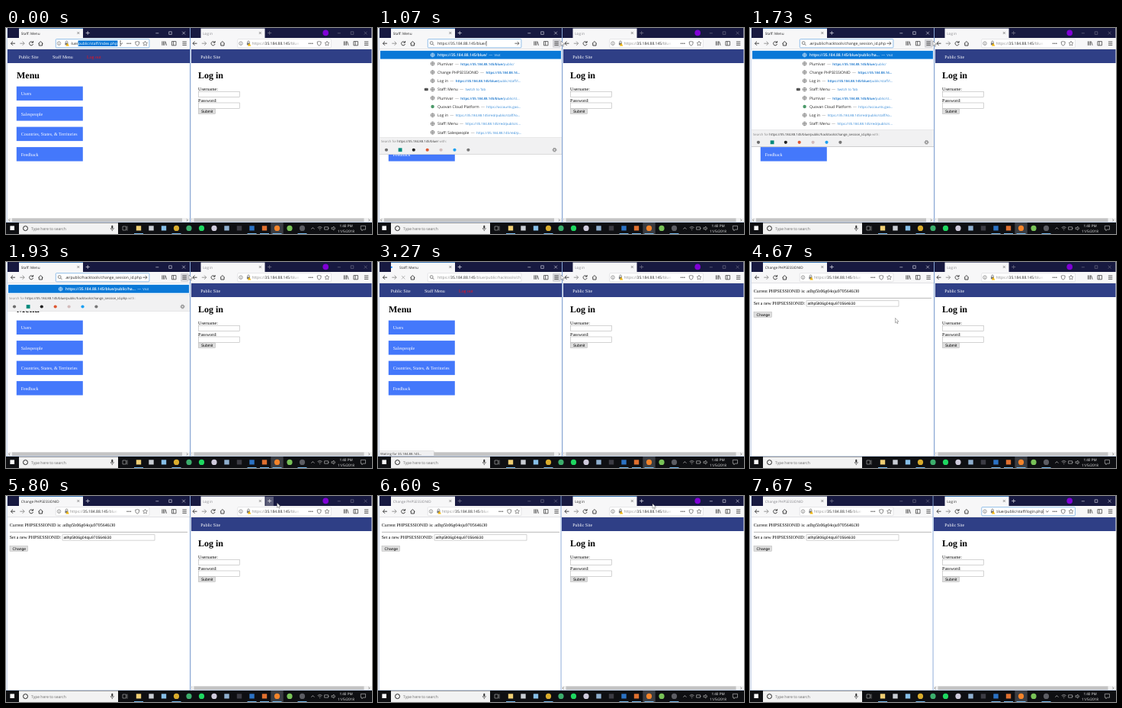
Write an HTML page that moves like this. It is 480 px wide and 270 px high and loops after 8000 ms.

```html
<!DOCTYPE html>
<html lang="en">
<head>
<meta charset="utf-8">
<title>Two browser windows</title>
<style>
html, body { margin: 0; width: 100%; height: 100%; overflow: hidden; background: #fff; }
svg { display: block; }
#stage { width: 100vw; height: 100vh; }
text { font-family: "Open Sans", "Noto Sans", sans-serif; white-space: pre; text-rendering: geometricPrecision; }
.serif { font-family: "Liberation Serif", serif; }
.arial { font-family: "Liberation Sans", sans-serif; }
.ctl { stroke: #e4e4ee; }
.title { fill: #222; }
.accent { fill: #4a9be8; }
.off .ctl { stroke: #77788c; }
.off .title { fill: #85858a; }
.off .accent { fill: #9aa0b4; }
</style>
</head>
<body>
<svg id="stage" viewBox="0 0 480 270"></svg>
<script>
const LOOP = 8000, RIGHT = 238.5, ROW = 11.25;
const HOST = "35.184.88.145", BASE = "https://" + HOST + "/", BLUE = BASE + "blue/";
const TARGET = "public/hacktools/change_session_id.php";
const SESSION = "atlhp5lt06g04oju9705646i30";

const R = (x, y, w, h, fill, more = "") =>
  `<rect x="${x}" y="${y}" width="${w}" height="${h}" fill="${fill}" ${more}/>`;
const C = (x, y, r, fill, more = "") => `<circle cx="${x}" cy="${y}" r="${r}" fill="${fill}" ${more}/>`;
const P = (d, stroke = "#444", w = 0.8, more = "") =>
  `<path d="${d}" fill="none" stroke="${stroke}" stroke-width="${w}" ${more}/>`;
const T = (x, y, size, str, fill = "#222", more = "") =>
  `<text x="${x}" y="${y}" font-size="${size}" fill="${fill}" ${more}>${str}</text>`;
const serif = (x, y, str, fill = "#000", size = 5.95, more = "") => T(x, y, size, str, fill, `class="serif" ${more}`);
const arial = (x, y, str) => T(x, y, 5, str, "#000", 'class="arial"');
const G = (id, body, more = "") => `<g id="${id}" ${more}>${body}</g>`;
const clip = (x, y, w, h, body) =>
  `<svg x="${x}" y="${y}" width="${w}" height="${h}" viewBox="${x} ${y} ${w} ${h}">${body}</svg>`;
const span = (str, fill, more = "") => `<tspan fill="${fill}" ${more}>${str}</tspan>`;

// ---- toolbar pieces, in left-window coordinates
const urlBox = focus => R(65.3, 14.6, 122.6, 11.2, "#fff",
  `rx="1" stroke="${focus ? "#5c9fdf" : "#cfcfd2"}" stroke-width="${focus ? 0.65 : 0.5}"`);
const pageIcons = C(69.5, 20.2, 2.3, "none", 'stroke="#666" stroke-width=".6"') +
  P("M69.5 19.8V21.6M69.5 18.6V19.1", "#666", 0.7) +
  P("M78.2 19.5V18.3a1.3 1.3 0 0 1 2.6 0V19.5", "#666", 0.7) + R(77.4, 19.4, 4, 2.9, "#777") +
  '<path d="M80.6 19.8l2.2 3.6h-4.4z" fill="#f2b600"/>';
const pageActions = [159, 161.2, 163.4].map(x => C(x, 20.2, 0.75, "#444")).join("") +
  P("M169.8 18q2.2 0 2.4 -.6q.2 .6 2.4 .6v2q0 2.2-2.4 3.2q-2.4-1-2.4-3.2z", "#555", 0.7) +
  P("M182.5 17.2l.9 2 2.1.2-1.6 1.4.5 2.2-1.9-1.1-1.9 1.1.5-2.2-1.6-1.4 2.1-.2z", "#555", 0.6);
const dropMark = P("M149.6 19.5l1.7 1.6 1.7-1.6", "#444", 0.8);
const lens = C(70.2, 19.6, 1.9, "none", 'stroke="#666" stroke-width=".8"') + P("M71.6 21l1.8 1.9", "#666", 0.9);
const goArrow = P("M179.4 20.2H185M182.8 18l2.2 2.2-2.2 2.2", "#444", 0.8);
const shade = path => span("https://", "#8a8a8a") + span(HOST, "#222") + span("/" + path, "#8a8a8a");
const idleUrl = urlBox(false) + pageIcons + pageActions +
  clip(84, 14, 62, 12, T(84, 22, 5, shade("blue/public/"))) + R(139, 16, 8, 9, "url(#fade)");
const tailUrl = body => urlBox(true) + pageIcons + pageActions + dropMark + clip(85, 14, 62, 12, body);
const tail = (str, fill = "#222", x = 146) => T(x, 22, 5, str, fill, 'text-anchor="end"');

const chrome = () => R(2, 0, 239, 13, "#171940") + R(17, 1, 84, 12.6, "#f7f7f8") +
  R(17, 0.3, 84, 0.7, "", 'class="accent"') +
  P("M93.3 5l3 3M96.3 5l-3 3", "#555", 0.6) +
  P("M104.7 6.5h5M107.2 4v5", "", 0.7, 'class="ctl"') +
  P("M196.3 6.8h4M213.7 4.8h3.6v3.6h-3.6zM231.2 4.7l3.8 3.8M235 4.7l-3.8 3.8", "", 0.6, 'class="ctl"') +
  R(2, 13, 239, 15, "#f7f7f8") + R(2, 27.4, 239, 0.6, "#d4d4d8") +
  P("M12 20.2H6.5M9 17.6l-2.6 2.6L9 22.8", "#333", 0.9) +
  P("M18.3 20.2H24M21.6 17.6l2.6 2.6-2.6 2.6", "#8c8c8c", 0.9) +
  P("M42.4 20.4l3-2.8 3 2.8M43.3 20v3h4.2v-3", "#333", 0.9) +
  P("M204.8 17.4v5.4M206.4 17.4v5.4M208 17.4v5.4M209 17.6l1.6 5.2", "#444", 0.8) +
  P("M217.4 17.6h5.6v5.2h-5.6zM219.6 17.6v5.2", "#444", 0.8);
const menuBars = P("M231.4 18h5.4M231.4 20.2h5.4M231.4 22.4h5.4", "#333", 0.8);
const reload = P("M35.2 19a2.5 2.5 0 1 0 .3 2M35.6 17v2.2h-2.2", "#333", 0.9);
const stop = P("M31 18l4.4 4.4M35.4 18l-4.4 4.4", "#b0b0b0", 0.9);
const title = (str, x = 19.7) => T(x, 8.5, 4.65, str, "", 'class="title"');
const scrollbar = R(2, 249, 239, 5.5, "#f0f0f0") + R(8, 249.4, 223, 4.7, "#c4c4c4") +
  P("M5 250.4l-1.4 1.4 1.4 1.4M237 250.4l1.4 1.4-1.4 1.4", "#555", 0.7);
const navBar = R(2, 28, 239, 18, "#2f3f86") + serif(16.7, 39.6, "Public Site", "#fff");
const field = (x, y, w) => R(x, y, w, 7.3, "#fff", 'stroke="#a8a8a8" stroke-width=".5"');
const button = (x, y, w, str) => R(x, y, w, 6.8, "#dedede", 'stroke="#a5a5a5" stroke-width=".4"') + arial(x + 3.6, y + 5.1, str);
const heading = (x, str) => serif(x, 66, str, "#000", 12, 'font-weight="700"');

// ---- pages
const menuPage = navBar + serif(61, 39.6, "Staff Menu", "#fff") + serif(106, 39.6, "Log out", "#f0101c") +
  heading(14, "Menu") +
  ["Users", "Salespeople", "Countries, States, &amp; Territories", "Feedback"].map((s, i) =>
    R(13.8, 76.6 + i * 26.5, 87, 18.5, "#4478fb") + serif(19.8, 88 + i * 26.5, s, "#fff")).join("") + scrollbar;
const sessionPage = serif(4.8, 39.5, "Current PHPSESSIONID is: " + SESSION) + R(5, 46.9, 233, 0.7, "#9a9a9a") +
  serif(4.8, 56.4, "Set a new PHPSESSIONID:") + field(74, 50.8, 121) + arial(75.4, 56.2, SESSION) +
  button(5, 65.5, 23.6, "Change");
const loginPage = navBar + heading(13.5, "Log in") +
  serif(13.6, 82, "Username:") + field(13.9, 83.3, 54) + serif(13.6, 96.8, "Password:") + field(13.9, 98, 54) +
  button(13.8, 105.9, 22.4, "Submit") + scrollbar;

// ---- address suggestions
const globe = (y, c) => C(71.6, y, 2.4, "none", `stroke="${c}" stroke-width=".6"`) +
  P(`M69.2 ${y}h4.8M71.6 ${y - 2.4}v4.8`, c, 0.6);
const BOLD = 'font-weight="600"';
const lead = BASE.slice(0, 20);
const link = url => {
  const hit = [BLUE, lead + "…"].find(s => url.startsWith(s)) || "";
  return `<tspan dx="1" font-size="4.35">${span(hit, "#0a6cc8", BOLD)}${span(url.slice(hit.length), "#2f86d6")}</tspan>`;
};
const rows = [
  ["Plumivar", BLUE + "public/"],
  ["Change PHPSESSIONID", lead + "…"],
  ["Log in", BLUE + "public/staff/l…"],
  ["Staff: Menu", "Switch to Tab"],
  ["Plumivar", BLUE + "public/st…"],
  ["Quovan Cloud Platform", "https://accounts.goo…"],
  ["Log in", BASE + "red/public/staff/lo…"],
  ["Staff: Menu", BASE + "red/public/s…"],
  ["Staff: Salespeople", BASE + "red/p…"]
].map(([name, url], i) => {
  const y = 35.5 + (i + 1) * ROW;
  return (i === 5 ? C(71.6, y, 2.2, "#4c9a6a") : globe(y, "#555")) +
    (i === 3 ? R(60.8, y - 1.8, 5, 3.6, "#555", 'rx="1"') : "") +
    T(78, y + 1.8, 5, name + span(" —", "#888", 'dx="1"') + " " + link(url));
}).join("");
const visit = str => T(78, 37.3, 5, span(str, "#fff", BOLD) + span(" —", "#cfe4fa", 'dx="1"') +
  span(" Visit", "#e6f1fd", 'font-size="4.2" dx="1"'));
const ask = url => T(4, 49.2, 4.25, span("Search for ", "#888") + span(url, "#333") + span(" with:", "#888"));
const engines = ["#6d6d6d", "#00897b", "#222", "#de5833", "#d3bcbc", "#1da1f2", "#777"]
  .map((c, i) => i === 1 ? R(26.7, 56.1, 4.8, 4.8, c) : C(11 + i * 17.9, 58.5, 2.1, c)).join("");
const gear = C(231.5, 58.5, 1.6, "none", 'stroke="#555" stroke-width=".8"') +
  C(231.5, 58.5, 2.5, "none", 'stroke="#555" stroke-width=".7" stroke-dasharray="1 .96"');
const dropdown = `<svg id="dropClip" x="0" y="28" width="242" height="140">
  <g transform="translate(0 -28)">${R(2, 28, 239, 140, "#fff") + R(3, 29.8, 237, 10.8, "#0a78d7") + globe(35.4, "#fff")}
  ${rows}${G("visit1", visit(BLUE))}${G("visit2", visit(BLUE + "public/ha…"))}
  ${G("foot", R(2, 42.2, 239, 22.2, "#f1f1f2") + R(2, 42, 239, 0.4, "#d0d0d0") +
    G("ask1", ask(BLUE)) + G("ask2", ask(BLUE + TARGET)) +
    engines + gear + R(2, 64, 239, 0.6, "#b5b5b5"))}</g></svg>`;

// ---- taskbar
const apps = [
  [174, "#f0cf74", 1], [190.5, "#c9ced4", 1], [207, "#86bfe8", 1], [223.5, "#d9ac2c", 0], [240, "#3cae6c", 0],
  [256.5, "#1ed760", 0], [273, "#cfcbdc", 0], [289.5, "#8fb0cf", 1], [306, "#3c3c44", 1], [322.5, "#2b72c4", 1],
  [339, "#e0702f", 1], [355.5, "#f5842a", 0], [372, "#78c257", 0], [388.5, "#5c5d63", 0]
];
const taskbar = R(0, 255, 480, 15, "#0e0f12") + R(5.4, 259.4, 5.6, 5.6, "#fff") +
  R(17, 255.4, 130, 14.6, "#f2f2f2") + C(25.5, 262.6, 3, "none", 'stroke="#222" stroke-width="1"') +
  T(33, 264.6, 5, "Type here to search", "#666") +
  R(138.3, 258.8, 2, 4.2, "#333", 'rx="1"') + P("M137.2 262q0 2.4 2.1 2.4t2.1-2.4M139.3 264.4v1.8", "#333", 0.6) +
  P("M153 260h4.4v5H153zM159 259.6v6", "#bbb", 0.6) + R(347.3, 255, 16.4, 15, "#3b3d42") +
  apps.map(([x, c, sq]) => sq ? R(x - 3.2, 259.3, 6.4, 6.2, c) : C(x, 262.4, 3.6, c)).join("") +
  [174, 223.5, 322.5, 339, 355.5, 388.5].map(x => R(x - 6, 269, 12, 1, "#76b9ed")).join("") +
  P("M400.4 263.6l2-2 2 2", "#ccc", 0.7) +
  P("M408.6 261.6q3-2.6 6 0M409.8 263q1.8-1.6 3.6 0M411 264.6h1.2", "#ccc", 0.6) +
  P("M417.6 260.8h5v3.4h-5zM423.2 262v1", "#ccc", 0.6) +
  P("M427 261.6h1.4l1.6-1.5v5l-1.6-1.5H427zM431.2 261.4q.9 1.1 0 2.4", "#ccc", 0.6) +
  T(446, 260.9, 4.6, "1:40 PM", "#f4f4f4", 'text-anchor="middle"') +
  T(446, 267.9, 4.6, "11/5/2018", "#f4f4f4", 'text-anchor="middle"') +
  P("M465.3 259.4h6.2v4.8h-3.2l-1.4 1.6v-1.6h-1.6z", "#ccc", 0.6);

const stage = document.getElementById("stage");
stage.innerHTML = `<defs><linearGradient id="fade"><stop stop-color="#fff" stop-opacity="0"/><stop offset="1" stop-color="#fff"/></linearGradient></defs>` +
  R(0, 0, 480, 270, "#fff") +
  G("right", chrome() + G("plusHover", R(102, 1, 10.4, 12, "#5b5d78") + P("M104.7 6.5h5M107.2 4v5", "#eee", 0.7)) +
    title("Log in") + C(180.7, 6.4, 3.8, "#8000d7") + reload + menuBars +
    G("rIdle", idleUrl) +
    G("rAll", tailUrl(R(84, 16.4, 62.4, 7.6, "#0a78d7") + T(84, 22, 5, BLUE + "public/", "#fff"))) +
    G("rTail", tailUrl(tail("blue/public/staff/login.php") + R(146.2, 17, 0.5, 6.6, "#000"))) +
    loginPage, `transform="translate(${RIGHT} 0)"`) +
  G("left", R(0, 0, 241, 255, "#fff") + chrome() + G("menuHover", R(229, 14.8, 10.6, 11, "#d4d4d8", 'rx="1"')) + menuBars +
    G("tab1", title("Staff: Menu")) +
    G("tabLoad", C(0, 6.8, 1.1, "#0a84ff", 'id="dot"') + title("Staff: Menu", 28)) +
    G("tab2", title("Change PHPSESSIONID")) + G("reload", reload) + G("stop", stop) +
    G("lSel", tailUrl(tail("blue/", "#222", 94.6) +
      R(94.6, 16.4, 51.8, 7.6, "#0a78d7") + tail("public/staff/index.php", "#fff"))) +
    G("lBase", urlBox(true) + lens + goArrow + T(78, 22, 5, BLUE) + R(141.8, 17, 0.5, 6.6, "#000")) +
    G("lPaste", urlBox(true) + lens + goArrow + clip(78, 14, 101, 12, tail(BLUE + TARGET, "#222", 178))) +
    G("lLoad", urlBox(false) + lens + clip(78, 14, 109, 12, T(78, 22, 5, shade("blue/" + TARGET)))) +
    G("lIdle", idleUrl) +
    G("menuPage", menuPage) + G("sessionPage", sessionPage) +
    G("status", R(1.4, 247.8, 72, 6.7, "#f0f0f1", 'stroke="#c4c4c4" stroke-width=".4"') +
      T(3, 252.8, 4.3, "Waiting for " + HOST + "…", "#333")) +
    G("drop", dropdown)) +
  R(0.8, 0, 0.7, 255, "#9db4da") + R(0, 254.4, 480, 0.6, "#9db4da") +
  G("edgeL", R(241, 0, 1, 255, "#86a6d6") + R(242, 13, 1, 242, "#e9ecf2")) +
  G("edgeR", R(239.6, 0, 0.9, 255, "#86a6d6")) +
  taskbar +
  G("arrow", '<path d="M0 0v6.4l1.5-1.4 1 2.3 1-.4-1-2.3h2z" fill="#fff" stroke="#444" stroke-width=".4"/>') +
  G("beam", P("M-1-3h2M0-3v6M-1 3h2", "#222", 0.5));

const $ = id => document.getElementById(id);
const show = (id, on) => $(id).setAttribute("visibility", on ? "inherit" : "hidden");

const DELETE = 870, PASTE = 1670, ENTER = 2870, LOADED = 3730, SWITCH = 6130, FOCUS = 6930, END = 7670;
const spans = {
  lSel: [0, DELETE], lBase: [DELETE, PASTE], lPaste: [PASTE, ENTER], lLoad: [ENTER, LOADED], lIdle: [LOADED, LOOP],
  drop: [DELETE, ENTER], visit1: [DELETE, PASTE], ask1: [DELETE, PASTE], visit2: [PASTE, ENTER], ask2: [PASTE, ENTER],
  tab1: [0, ENTER], tabLoad: [ENTER, LOADED], tab2: [LOADED, LOOP], stop: [ENTER, LOADED], status: [ENTER, LOADED],
  menuPage: [0, LOADED], sessionPage: [LOADED, LOOP], menuHover: [300, 3800], plusHover: [5400, 5900],
  rIdle: [0, FOCUS], rAll: [FOCUS, END], rTail: [END, LOOP], edgeL: [0, SWITCH], edgeR: [SWITCH, LOOP]
};
const path = [
  [0, 150, 20], [70, 150, 20], [330, 240, 17], [3730, 240, 17], [4200, 186, 81], [4400, 186, 81], [4670, 190.5, 73.5],
  [5200, 368, 14], [5800, 355.5, 9], [6130, 356, 9], [6400, 360, 10], [6600, 360, 10], [6670, 372, 20], [8000, 372, 20]
];
const ease = p => { p = Math.min(1, Math.max(0, p)); return p * p * (3 - 2 * p); };

function pointer(t) {
  const i = Math.max(1, path.findIndex(k => k[0] > t));
  const [t0, x0, y0] = path[i - 1], [t1, x1, y1] = path[i];
  const p = ease((t - t0) / (t1 - t0));
  return [x0 + (x1 - x0) * p, y0 + (y1 - y0) * p];
}

function draw(t) {
  for (const id in spans) show(id, t >= spans[id][0] && t < spans[id][1]);
  show("reload", t < ENTER || t >= LOADED);
  $("left").setAttribute("class", t < SWITCH ? "" : "off");
  $("right").setAttribute("class", t < SWITCH ? "off" : "");
  $("dot").setAttribute("cx", 21 - 3.2 * Math.cos((t - 3270) / 1050 * 2 * Math.PI));

  const extra = 9 * ROW * (1 - ease((t - 1700) / 160));
  $("foot").setAttribute("transform", `translate(0 ${extra})`);
  $("dropClip").setAttribute("height", (36.6 + extra) * (0.3 + 0.7 * ease((t - DELETE) / 130)));

  const [x, y] = pointer(t), text = t < 160 || t >= 6640;
  show("arrow", !text);
  show("beam", text && t < END);
  $(text ? "beam" : "arrow").setAttribute("transform", `translate(${x} ${y})`);
}

function tick() {
  draw(performance.now() % LOOP);
  requestAnimationFrame(tick);
}
tick();
</script>
</body>
</html>
```
